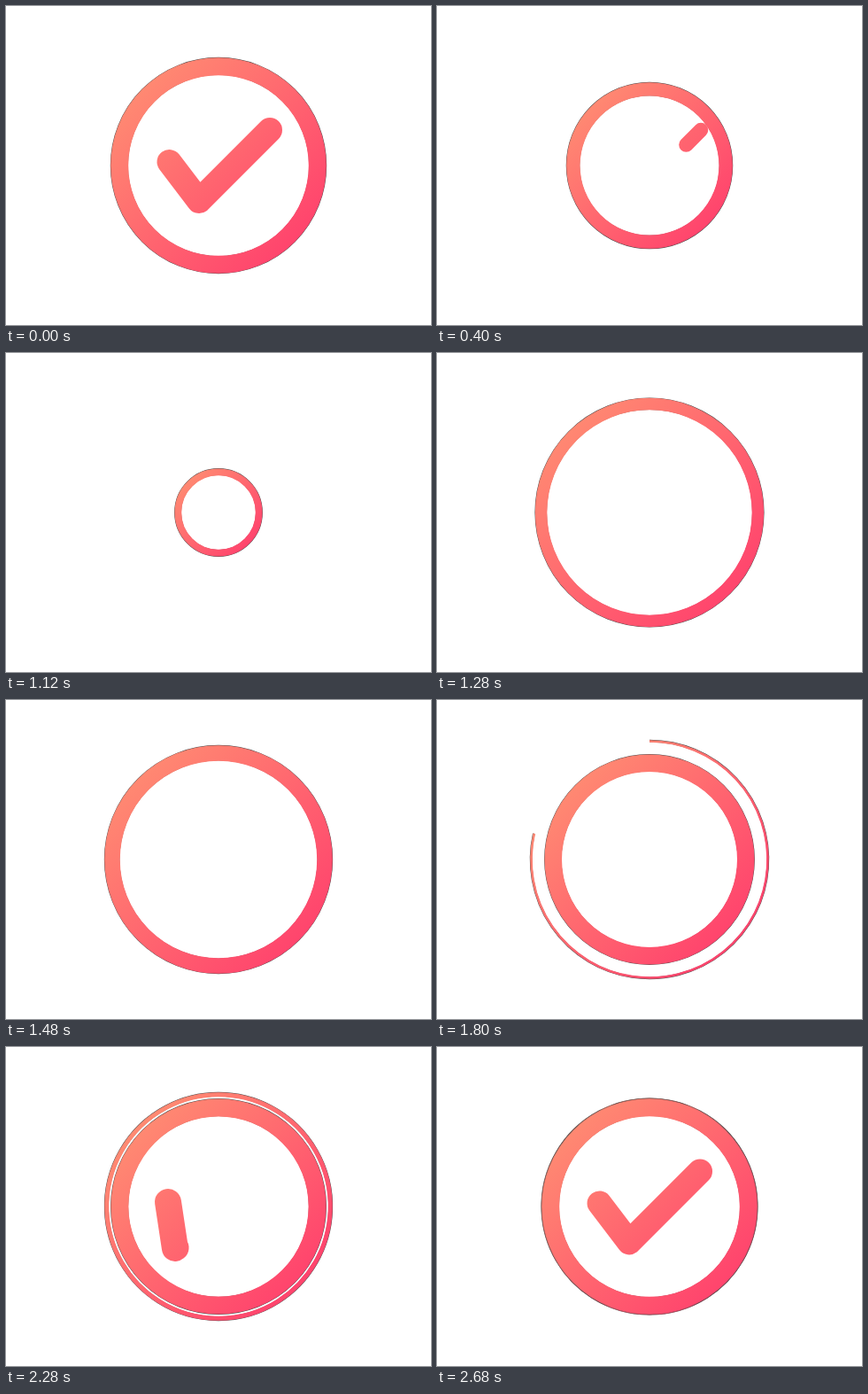
An HTML page that plays this animation: 480x360 px, repeating every 2.72 s.

```html
<!DOCTYPE html>
<html lang="en">
<head>
<meta charset="utf-8">
<title>Check loop</title>
<style>
  html, body { margin: 0; width: 100%; height: 100%; overflow: hidden; background: #fff; }
  svg { display: block; width: 100%; height: 100%; }
</style>
</head>
<body>
<svg viewBox="0 0 480 360">
  <defs>
    <linearGradient id="warm" gradientUnits="userSpaceOnUse" x1="145" y1="95" x2="322" y2="267">
      <stop offset="0" stop-color="#ff8a72"/>
      <stop offset="1" stop-color="#ff456d"/>
    </linearGradient>
  </defs>
  <g fill="none" stroke="url(#warm)">
    <path id="haloEdge" stroke="#4a4a4a"/>
    <path id="halo"/>
    <circle id="ringEdge" cx="240" cy="180" stroke="#4a4a4a"/>
    <circle id="ring" cx="240" cy="180" r="112"/>
    <path id="check" stroke-linecap="round" stroke-linejoin="round"/>
  </g>
  <circle id="dot" fill="#ff5f6b"/>
</svg>
<script>
const LOOP = 2720, CX = 240, CY = 180, EDGE = 0.4;
const $ = id => document.getElementById(id);
const clamp = x => Math.max(0, Math.min(1, x));
const span = (t, a, b) => clamp((t - a) / (b - a));
const sine = p => (1 - Math.cos(Math.PI * p)) / 2;
const easeOut = (p, n) => 1 - Math.pow(1 - p, n);
const mix = (a, b, p) => a + (b - a) * p;
const mixPt = (a, b, p) => [mix(a[0], b[0], p), mix(a[1], b[1], p)];
const dist = (a, b) => Math.hypot(b[0] - a[0], b[1] - a[1]);
const set = (el, attrs) => { for (const k in attrs) el.setAttribute(k, attrs[k]); };
const show = (el, on) => el.setAttribute('visibility', on ? 'visible' : 'hidden');

// Smooth curve through [time, value] keys, flat at the peaks.
function curve(keys, t) {
  const n = keys.length - 1;
  if (t <= keys[0][0]) return keys[0][1];
  if (t >= keys[n][0]) return keys[n][1];
  const slope = i => (keys[i + 1][1] - keys[i][1]) / (keys[i + 1][0] - keys[i][0]);
  const tangent = i => {
    if (i === 0) return slope(0);
    if (i === n) return 0;
    const a = slope(i - 1), b = slope(i);
    return a * b <= 0 ? 0 : 2 * a * b / (a + b);
  };
  let i = 0;
  while (t > keys[i + 1][0]) i++;
  const h = keys[i + 1][0] - keys[i][0], u = (t - keys[i][0]) / h, v = 1 - u;
  return keys[i][1] * (1 + 2 * u) * v * v + tangent(i) * h * u * v * v
       + keys[i + 1][1] * u * u * (3 - 2 * u) - tangent(i + 1) * h * u * u * v;
}

const GROW = [[1040, 0], [1120, 49], [1340, 139.5], [1480, 128.8], [1800, 118.5], [2000, 121], [2280, 121.6], [2720, 121.8]];
const WIDTH = [[1040, 0], [1120, 7.7], [1480, 17.5], [1800, 19.5], [2280, 20], [2720, 20]];
const HALO_R = [[2160, 133.5], [2240, 129.5], [2280, 126.3], [2400, 120.4], [2680, 119.7]];

const START = [184.5, 176], BEND = [218, 220], END = [298, 140];
const START_IN = [184, 174.6], BEND_IN = [191.7, 226.6];

function drawRing(t) {
  let outer, width;
  if (t < 1000) {
    const k = 1 - Math.pow(span(t, 0, 655), 3);
    outer = 121.8 * k;
    width = 20 * k;
  } else {
    outer = curve(GROW, t);
    width = curve(WIDTH, t);
  }
  const on = outer > 0.3, r = outer - width / 2, k = r / 112;
  show($('ring'), on);
  show($('ringEdge'), on);
  if (!on) return;
  set($('ring'), {
    transform: `translate(${CX} ${CY}) scale(${k}) translate(${-CX} ${-CY})`,
    'stroke-width': width / k
  });
  set($('ringEdge'), { r: r + EDGE, 'stroke-width': width });
}

function arc(r, p) {
  const a = 2 * Math.PI * Math.min(p, 0.9999);
  const x = CX + r * Math.sin(a), y = CY - r * Math.cos(a);
  return `M${CX} ${CY - r}A${r} ${r} 0 ${p > 0.5 ? 1 : 0} 1 ${x} ${y}` + (p >= 1 ? 'Z' : '');
}

function drawHalo(t) {
  const p = sine(span(t, 1600, 1890)), on = p > 0;
  show($('halo'), on);
  show($('haloEdge'), on);
  if (!on) return;
  const r = curve(HALO_R, t), w = mix(2.6, 5, sine(span(t, 1780, 2100)));
  set($('halo'), { d: arc(r, p), 'stroke-width': w });
  set($('haloEdge'), { d: arc(r + EDGE, p), 'stroke-width': w });
}

// Part of the tick between two distances along it.
function tick(start, bend, from, to) {
  const a = dist(start, bend), b = dist(bend, END);
  const at = s => s <= a ? mixPt(start, bend, s / a) : mixPt(bend, END, (s - a) / b);
  const pts = [at(from)];
  if (from < a && to > a) pts.push(bend);
  pts.push(at(to));
  return 'M' + pts.map(p => p.join(' ')).join('L');
}

function drawCheck(t) {
  const leaving = t < 530, check = $('check');
  show(check, leaving || t > 2160);
  if (leaving) {
    const total = dist(START, BEND) + dist(BEND, END);
    set(check, {
      d: tick(START, BEND, total * sine(span(t, 0, 530)), total),
      'stroke-width': 28 * (1 - Math.pow(t / 625, 2)),
      transform: 'translate(0 0)'
    });
  } else if (t > 2160) {
    const settle = easeOut(span(t, 2280, 2680), 3);
    const start = mixPt(START_IN, START, settle), bend = mixPt(BEND_IN, BEND, settle);
    const to = dist(start, bend) * sine(span(t, 2160, 2280))
             + dist(bend, END) * easeOut(span(t, 2280, 2600), 2);
    const nudge = 1 - span(t, 2680, LOOP);
    set(check, {
      d: tick(start, bend, 0, to),
      'stroke-width': mix(30, 28, settle) * span(t, 2160, 2220),
      transform: `translate(${-nudge} ${nudge * 0.4})`
    });
  }
}

// The leftover dot swings out to the right and back to the centre.
function drawDot(t) {
  const on = t >= 530 && t < 1060;
  show($('dot'), on);
  if (!on) return;
  const u = sine(span(t, 530, 1045)), v = 1 - u;
  const bez = (a, b, c, d) => a * v * v * v + 3 * b * u * v * v + 3 * c * u * u * v + d * u * u * u;
  set($('dot'), { cx: bez(END[0], 600, 560, CX), cy: bez(END[1], 150, 410, CY), r: 4.5 });
}

function draw(t) {
  drawRing(t);
  drawHalo(t);
  drawCheck(t);
  drawDot(t);
}

const begin = performance.now();
function frame() {
  draw((performance.now() - begin) % LOOP);
  requestAnimationFrame(frame);
}
draw(0);
requestAnimationFrame(frame);
</script>
</body>
</html>
```
